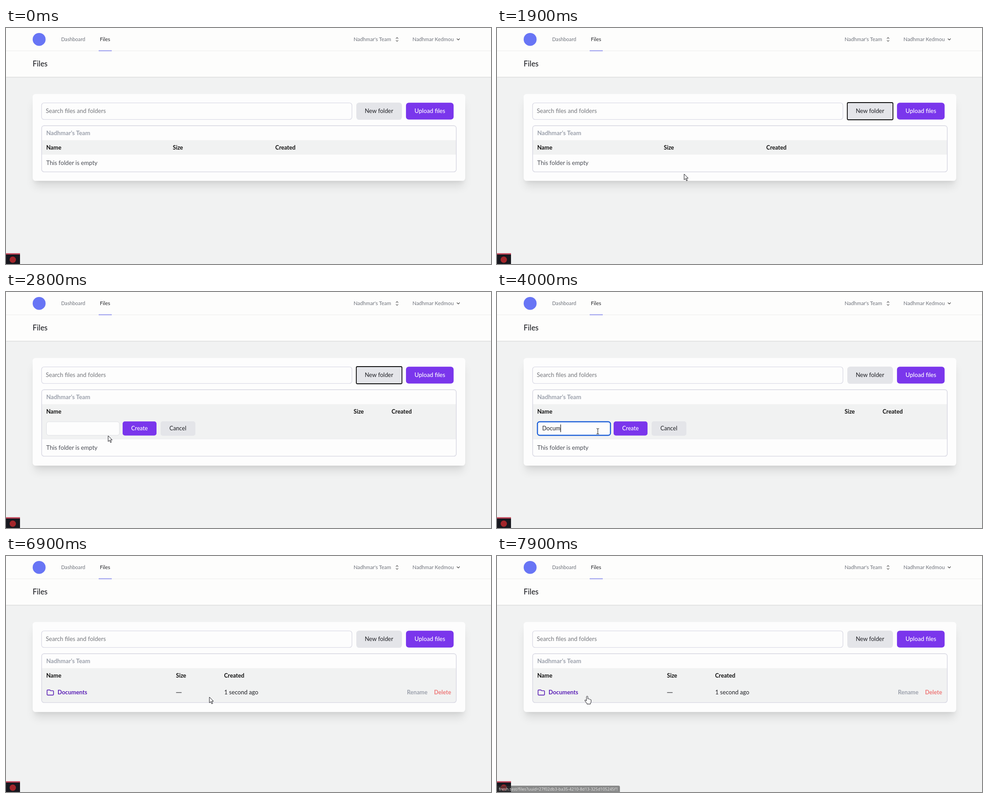
These frames come from a looping animation (1073x522 px, 8 s). An HTML page:

```html
<!DOCTYPE html>
<html lang="en">
<head>
<meta charset="utf-8">
<title>Files</title>
<style>
  html, body { margin: 0; width: 100%; height: 100%; overflow: hidden; background: #f1f2f2; }
  #top { position: absolute; inset: 0 0 auto; height: 108px; background: #fdfdfc; box-shadow: 0 1px 2px rgba(0,0,0,.12); }
  #card { position: absolute; left: 59px; top: 146px; width: 957px; background: #fdfdfd; border-radius: 6.4px;
    box-shadow: 0 16px 20px -4px rgba(0,0,0,.1), 0 8px 8px -4px rgba(0,0,0,.05); }
  svg { position: absolute; left: 0; top: 0; display: block; }
  text { font-family: Lato, sans-serif; white-space: pre; }
  .line { fill: none; stroke-linecap: round; stroke-linejoin: round; }
</style>
</head>
<body>
<div id="top"></div>
<div id="card"></div>
<svg id="ui" width="1073" height="522" viewBox="0 0 1073 522"></svg>
<script>
const LOOP = 8000, STEP = 100;
const INK = '#1f2025', GREY = '#e4e5e9', VIOLET = '#7a36ec', MUTED = '#9ca1ac', EDGE = '#dbdbe5', PAPER = '#fdfdfd', SHADE = '#f1f2f2';

const rect = (x, y, w, h, r, fill, more = '') =>
  `<rect x="${x}" y="${y}" width="${w}" height="${h}" rx="${r}" fill="${fill}" ${more}/>`;
const text = (x, y, s, size, fill, weight = 400, more = '') =>
  `<text x="${x}" y="${y}" font-size="${size}" fill="${fill}" font-weight="${weight}" ${more}>${s}</text>`;
const line = (d, stroke, width, more = '') =>
  `<path class="line" d="${d}" stroke="${stroke}" stroke-width="${width}" ${more}/>`;
const bold = (x, y, s, fill = '#111', size = 12.7) => text(x, y, s, size, fill, 700);
const group = (id, body) => `<g id="${id}">${body}</g>`;

// Table outline with a shaded area from the heading row down to `shade`
function table(bottom, shade, sizeX, createdX) {
  const r = shade < bottom - 1 ? 0 : 5;
  return rect(78.8, 216.1, 917.4, bottom - 216.9, 5.5, PAPER) +
    `<path d="M79 248.3H996V${shade - r}q0 ${r} ${-r} ${r}H${79 + r}q${-r} 0 ${-r} ${-r}z" fill="${SHADE}"/>` +
    rect(78.8, 216.1, 917.4, bottom - 216.9, 5.5, 'none', `stroke="${EDGE}" stroke-width="1.6"`) +
    bold(89, 236.9, "Nadhmar's Team", MUTED, 13.3) +
    bold(89, 268.5, 'Name') + bold(sizeX, 268.5, 'Size') + bold(createdX, 268.5, 'Created');
}
const emptyNote = y => text(89, y, 'This folder is empty', 13.2, '#4a4d55');

const header =
  '<circle cx="73.3" cy="25.2" r="14.3" fill="#6875f5"/>' +
  text(122, 29.2, 'Dashboard', 11.2, '#6f737c') + text(207.7, 29.2, 'Files', 11.3, INK) +
  rect(0, 50.2, 1073, .8, 0, '#ececea') + rect(205, 49.6, 29, 1.6, 0, '#8184ea') +
  text(769, 28.9, "Nadhmar's Team", 11.5, '#6f737c') +
  text(899.3, 28.9, 'Nadhmar Kedmou', 11.5, '#6f737c') +
  line('M863 23.3l2.2-2.3 2.2 2.3M863 27.4l2.2 2.3 2.2-2.3', '#555', 1.1) +
  line('M997.8 23.7l2.8 2.8 2.8-2.8', '#555', 1.3) +
  text(59, 85.2, 'Files', 16.4, INK, 500);

const toolbar =
  rect(78.6, 165.6, 686.8, 36.8, 5.8, PAPER, `stroke="${EDGE}" stroke-width="1.4"`) +
  text(88, 188.4, 'Search files and folders', 13.15, '#75777c') +
  rect(775, 165, 101, 38, 6.4, GREY) +
  rect(775, 165, 101, 38, 2.5, GREY, 'id="newRing" stroke="#101010" stroke-width="1.8"') +
  text(793.7, 188.4, 'New folder', 12.9, INK) +
  rect(884.9, 165.2, 105.4, 37.4, 6.2, VIOLET) +
  text(903.8, 188.4, 'Upload files', 13.1, '#fff', 500);

const form = table(364, 325, 769, 853) +
  rect(79.6, 324.6, 915.8, .8, 0, '#e6e6ec') +
  rect(89.5, 287, 161.5, 30, 5, PAPER, 'id="field" stroke-width="1"') +
  text(100, 306.2, '', 12.65, INK, 400, 'id="typed"') +
  rect(0, 293, 1.2, 17, 0, '#111', 'id="caret"') +
  rect(258, 286.3, 75, 31.2, 5, VIOLET) +
  rect(257.9, 286.3, 75.2, 31.4, 3, VIOLET, 'id="createRing" stroke="#141018" stroke-width="1.8"') +
  text(277, 306.2, 'Create', 12.5, '#fff', 500) +
  rect(342, 286, 77, 32, 5, GREY) + text(361.5, 306.2, 'Cancel', 12.7, INK) +
  emptyNote(348.8);

const listing = table(325, 324.5, 376, 482.5) +
  line('M3 7v10a2 2 0 002 2h14a2 2 0 002-2V9a2 2 0 00-2-2h-6l-2-2H5a2 2 0 00-2 2z', '#5b21b6', 2,
    'transform="translate(88.4 292.4) scale(.8)"') +
  bold(114, 306.2, 'Documents', '#5b21b6', 12.85) +
  rect(376.3, 301.5, 12.2, 1.1, 0, INK) + text(482.7, 306.2, '1 second ago', 13.05, INK) +
  bold(887, 306.2, 'Rename', MUTED) + bold(947, 306.2, 'Delete', '#ee7b7b');

const badge = rect(0, 498.5, 31, 24, 0, '#18181f') + rect(0, 498.5, 31, 2.4, 0, '#dc4a60') +
  '<circle cx="15" cy="512.5" r="7" fill="#a3262b"/>';

const status =
  '<path d="M0 508H269q3 0 3 3V522H0z" fill="#323232" fill-opacity=".54"/>' +
  text(4, 519.4, 'fresh.test/files?uuid=27f02db3-ba35-4210-8d13-325d105245f1', 9.05, '#e2e2e2', 400,
    'style="font-family:\'Noto Sans\',sans-serif"');

const shape = (d, id) =>
  `<path id="${id}" d="${d}" fill="#fff" stroke="#15151a" stroke-width="1" stroke-linejoin="round"/>`;
const pointers =
  shape('M0 0V12.8L3 10l2.2 5 2-.9L5 9.2h4z', 'arrow') +
  shape('M-1.5 1.5q0-1.5 1.5-1.5t1.5 1.5V6q2-.8 2.6.6 2-.6 2.5.8 2.1-.3 2.1 1.6V12q0 2-1.5 4v1.5H-.5V16q-3-3-4.5-6-.3-1.8 1.2-1.6l2.3 2z', 'hand') +
  line('M-2.5-6Q0-6 0-5V5Q0 6-2.5 6M2.5-6Q0-6 0-5M2.5 6Q0 6 0 5', '#222', 1.1, 'id="beam"');

document.getElementById('ui').innerHTML = header + toolbar +
  group('empty', table(319, 280, 369, 595.8) + emptyNote(303)) +
  group('form', form) + group('listing', listing) +
  badge + group('status', status) + group('pointer', pointers);

const el = id => document.getElementById(id);
const show = (id, on) => el(id).setAttribute('display', on ? 'inline' : 'none');

// Pointer path: time, x, y, look held until the next stop
const path = [
  [100, 700, 262, 'arrow'], [300, 810, 215, 'arrow'], [500, 833, 189, 'hand'], [1600, 833, 189, 'hand'],
  [1700, 640, 262, 'arrow'], [1800, 470, 315, 'arrow'], [1900, 414, 323, 'arrow'], [2000, 414, 323, 'arrow'],
  [2100, 405, 322, 'arrow'], [2500, 290, 320, 'arrow'], [2800, 226, 318, 'arrow'], [2900, 224, 312, 'arrow'],
  [3000, 223, 308, 'beam'], [5300, 223, 308, 'beam'], [5500, 248, 307, 'beam'], [5600, 263.5, 306.5, 'hand'],
  [5800, 263.5, 306.5, 'hand'], [5900, 325, 306, 'hand'], [6000, 470, 300, 'arrow'], [6200, 606, 292, 'arrow'],
  [6300, 612, 292, 'arrow'], [6800, 612, 292, 'arrow'], [6900, 450, 312, 'arrow'], [7000, 307, 319, 'arrow'],
  [7700, 222, 316, 'arrow'], [7800, 205, 311, 'hand'], [7900, 199.5, 310, 'hand']
];
const word = 'Documents';
const keyTimes = [3500, 3600, 3800, 3900, 4000, 4100, 4200, 4300, 4600];

function movePointer(t) {
  show('pointer', t >= path[0][0]);
  const i = Math.max(0, path.findLastIndex(p => p[0] <= t));
  const a = path[i], b = path[i + 1] || a;
  const k = b === a ? 0 : Math.max(0, (t - a[0]) / (b[0] - a[0]));
  const x = a[1] + (b[1] - a[1]) * k, y = a[2] + (b[2] - a[2]) * k;
  el('pointer').setAttribute('transform', `translate(${x} ${y})`);
  for (const look of ['arrow', 'hand', 'beam']) show(look, look === a[3]);
}

function draw(now) {
  const t = Math.floor(now % LOOP / STEP) * STEP;
  const view = t < 2100 ? 'empty' : t < 6900 ? 'form' : 'listing';
  for (const id of ['empty', 'form', 'listing']) show(id, id === view);
  el('card').style.height = { empty: 192, form: 237.5, listing: 198.5 }[view] + 'px';

  show('newRing', t >= 1300 && t < 3100);
  show('createRing', t >= 5700);
  show('status', t >= 7800);

  const focused = t >= 3100 && t < 5700;
  el('field').setAttribute('stroke', focused ? '#1d5fd8' : '#dedfe3');
  el('field').setAttribute('stroke-width', focused ? 2.4 : 1);

  const count = keyTimes.filter(k => k <= t).length;
  const typed = el('typed');
  typed.textContent = word.slice(0, count);
  const since = t - (count ? keyTimes[count - 1] : 3100);
  show('caret', focused && since % 1000 < 500);
  if (view === 'form') el('caret').setAttribute('x', 100 + (count ? typed.getComputedTextLength() : 0));

  movePointer(t);
}

const start = performance.now();
function tick() {
  draw(performance.now() - start);
  requestAnimationFrame(tick);
}
tick();
</script>
</body>
</html>
```
